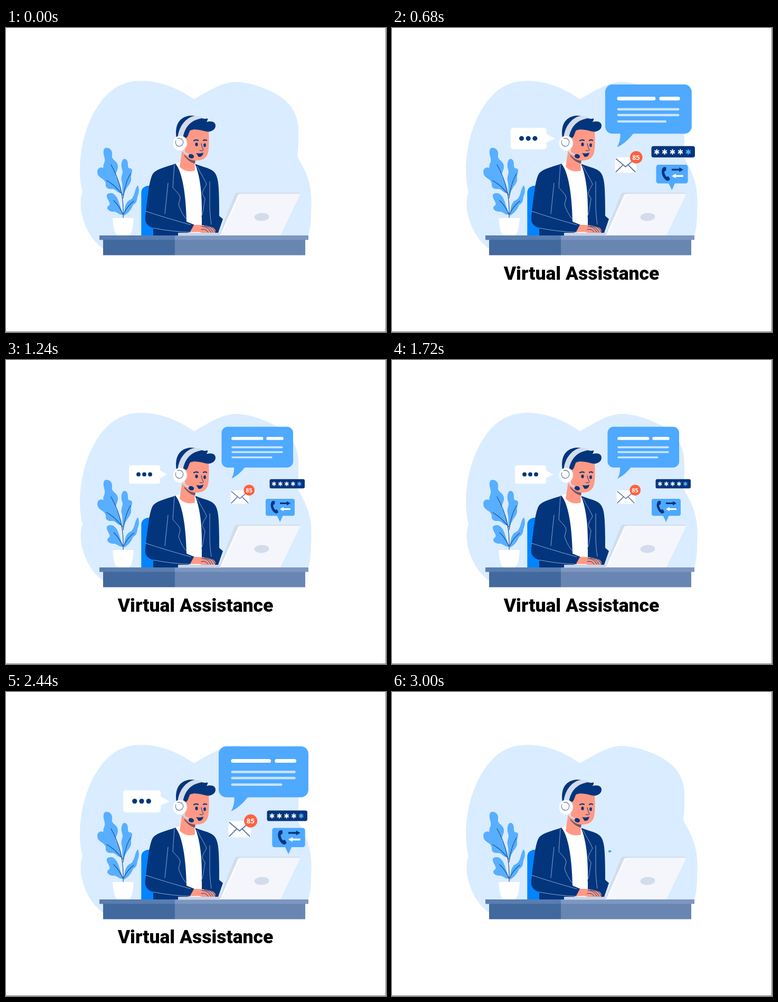
An HTML page with a canvas for the animation above (3.04 s loop, 720 px wide and 576 px high).

```html
<!DOCTYPE html>
<html lang="en">
<head>
<meta charset="utf-8">
<title>Virtual Assistance</title>
<style>
  html, body { margin: 0; width: 100%; height: 100%; overflow: hidden; background: #fff; }
  canvas { display: block; width: 720px; height: 576px; }
</style>
</head>
<body>
<canvas id="stage" width="720" height="576"></canvas>
<script>
const ctx = document.getElementById('stage').getContext('2d');
const LOOP = 3040, STEP = 40;
const NAVY = '#03357d', SKY = '#4ea9ff', LEAF = '#58afff', SKIN = '#ff9985', GREY = '#d3dcea', SEAM = '#8ba6cf';

function fill(d, color) {
  ctx.fillStyle = color;
  ctx.fill(new Path2D(d));
}

function line(d, color, width = 1, cap = 'round') {
  ctx.strokeStyle = color;
  ctx.lineWidth = width;
  ctx.lineCap = cap;
  ctx.lineJoin = 'round';
  ctx.stroke(new Path2D(d));
}

function oval(x, y, rx, ry, color, turn = 0) {
  ctx.fillStyle = color;
  ctx.beginPath();
  ctx.ellipse(x, y, rx, ry, turn, 0, Math.PI * 2);
  ctx.fill();
}

function box(x, y, w, h, color, r = 0) {
  ctx.fillStyle = color;
  ctx.beginPath();
  ctx.roundRect(x, y, w, h, r);
  ctx.fill();
}

function backdrop() {
  box(0, 0, 720, 576, '#fff');
  fill('M356 135C325 113 290 100 257 100C225 100 200 112 178 142C155 174 140 220 140 270C140 286 142 300 145 311C140 322 141 340 143 350C149 380 165 405 184 418V400H570C577 385 578 365 578 350C579 335 579 322 577 306C573 280 563 262 552 244C553 232 555 215 554 190C552 160 538 140 510 124C485 110 455 102 433 102C405 104 380 122 356 135Z', '#daecff');
}

function plant() {
  fill('M190 227C198 227 202 233 201 241C199 250 211 251 212 261C213 270 205 276 209 284C213 292 218 300 219 310C211 302 208 288 197 281C188 275 181 266 186 256C190 248 183 240 185 232Q186 227 190 227Z', LEAF);
  fill('M174 268C178 262 186 264 188 269C191 276 201 274 207 280C215 288 213 300 220 313C213 315 209 306 202 305C192 306 188 302 189 295C188 284 173 286 173 272Q173 270 174 268Z', LEAF);
  fill('M224 248C230 248 231 254 231 260C231 267 234 265 238 267C241 272 236 277 237 285C238 296 227 300 222 319C219 309 222 300 219 290C217 280 223 276 220 268C217 260 219 249 224 248Z', LEAF);
  fill('M250 298C253 305 252 314 249 320C248 327 248 331 241 335C238 341 236 348 223 356C225 346 224 338 229 331C232 325 238 327 241 319C245 312 244 304 250 298Z', LEAF);
  fill('M191 316C195 311 203 312 207 317C213 323 214 332 222 354C213 354 210 347 203 348C194 348 189 341 194 337C202 333 189 324 191 316Z', LEAF);
  line('M222 359C223 325 219 295 199 259M221 316C207 299 199 294 191 289M222 322C225 300 231 284 236 276M223 352Q230 337 242 328M222 354Q214 336 204 327', '#1c5198', 1.2);
  fill('M202 360H242C241 375 239 385 236 390Q234 393 230 393H214Q210 393 208 390C204 383 203 370 202 360Z', '#fff');
}

function body() {
  fill('M256.3 394V313C256 303 263 298.5 274 298.5L292 394Z', '#0084ff');
  fill('M321 257C305 263 287 266 279 275C271 286 268 325 264 357C262 370 270 376 279 379V394H350L372 388H402L411 362L404 356C404 345 404 325 403 305C402 288 400 276 391 270C384 265 372 263 360 258Z', NAVY);
  fill('M321 257L334 252L358 257C367 278 371 310 371 340V388H346L342 366C341 315 334 272 321 257Z', '#fff');
  fill('M335 364L357 373L349 387H335Z', NAVY);
  line('M319 259L316 302C322 310 329 314 330 322L327 335C331 346 336 356 342 362M362 262C369 276 376 286 380 296C376 304 372 308 372 315L377 323C375 338 373 350 370 358M307 294L301 352M264 347Q300 359 350 373M279 379Q315 386 350 387M386 291V340Q387 360 389 372', SEAM);
  fill('M356 373C370 373 384 374 392 378C397 381 398 385 396 388H371C364 385 355 388 349 386Z', SKIN);
  line('M371 376Q383 376 388 387M376 375Q387 376 392 387M382 375Q393 377 396 386M370 382Q378 379 383 387', NAVY, 1);
}

function head() {
  fill('M334 230L329 263C338 272 348 273 358 270L357 250Z', SKIN);
  fill('M338 240C345 248 352 252 359 250L358 257C350 255 344 250 338 243Z', '#765763');
  fill('M342 198C352 188 370 190 384 195C385 212 385 230 382 239C378 249 368 252 356 251C345 249 338 239 338 224Z', SKIN);
  fill('M323 208C320 190 324 168 350 166C362 166 368 171 376 172C381 172 383 170 382 174L380 178C391 175 397 179 397 185C397 193 388 198 379 196C370 194 358 190 349 194C346 198 346 204 342 208Z', NAVY);
  fill('M325.5 206C328 186 341 169 358 166.5Q367 167 375 170.5C352 173 340 185 335.5 206Z', GREY);
  line('M335 233Q341 239 349 242', GREY, 3);
  oval(332, 218, 11.5, 13.5, GREY);
  oval(329.5, 218.5, 12.8, 14, '#fff');
  ctx.strokeStyle = '#5d7396';
  ctx.lineWidth = 1.1;
  ctx.beginPath();
  ctx.ellipse(328.5, 216.5, 7.3, 7.6, 0, -2, 3.6);
  ctx.stroke();
  oval(351, 243, 5.2, 4, NAVY, 0.35);
  line('M356 213.5Q360 211 364 213M374 213Q377 211 380 213', NAVY, 2.2);
  oval(361, 220.5, 2.6, 3.5, NAVY);
  oval(376.5, 222, 2.4, 3.5, NAVY);
  line('M370 219Q371 226 374 231Q372 234 367 232', NAVY, 1);
  fill('M360 237C366 238 370 238 374 236C373 242 369 245 365 244C363 242 363 240 360 237Z', NAVY);
}

function desk() {
  box(184, 401, 136, 29.5, '#42699e');
  box(320, 401, 247, 29.5, '#6986b2');
  box(177, 393, 149, 8.5, '#597db0');
  box(320, 393, 253, 8.5, '#7d97c2');
  box(326, 388, 80, 5.5, '#cbd5e6');
}

function laptop() {
  fill('M403 393L434 314Q435 312 438 312H556L557 315L440 316L408 393Z', GREY);
  fill('M405 393L440 316Q441 314 443 314H558L520 392.5Z', '#f4f6fb');
  line('M409 390L441 318', '#fff', 1.5);
  oval(484.5, 358, 14, 7.5, GREY, -0.06);
}

function title(s) {
  const left = Math.max(0, 1 - Math.max(0, s - 240) / 421);
  if (left === 1) return;
  ctx.font = '900 35.5px Roboto, sans-serif';
  ctx.textAlign = 'center';
  ctx.textBaseline = 'alphabetic';
  ctx.fillStyle = '#000';
  ctx.fillText('Virtual Assistance', 359, 477 - 47 * left * left);
}

function dots() {
  box(233, 199.5, 59, 35, '#fff', 4);
  fill('M291 209L306 217L291 224Z', '#fff');
  for (let i = 0; i < 3; i++) oval(251 + 11 * i, 216.7, 3.9, 3.9, NAVY);
}

function speech() {
  box(407.5, 122.5, 141.5, 80.5, SKY, 12);
  fill('M432 200C433 210 431 218 427 225C438 220 447 211 454 202Z', SKY);
  line('M430 145.5H487M499 145.5H527', '#fff', 6);
  line('M429 163H527M429 172.5H527M429 183H506', '#cbe5ff', 3.8);
}

function pin() {
  box(496.5, 225, 72.5, 19, NAVY, 3.5);
  for (let i = 0; i < 5; i++) {
    const x = 505.5 + 13.1 * i;
    for (let j = 0; j < 3; j++) {
      const a = Math.PI * (j / 3 + 0.5), dx = 4.5 * Math.cos(a), dy = 4.5 * Math.sin(a);
      line(`M${x - dx} ${234.7 - dy}L${x + dx} ${234.7 + dy}`, i < 4 ? '#fff' : LEAF, 1.9, 'butt');
    }
  }
}

function call() {
  box(492, 263, 55, 32.3, SKY, 4);
  fill('M513 294L519.3 307L525 294Z', SKY);
  fill('M505 267L509 267Q510 270 509 273L506 275Q507 281 510 284L513 283Q516 286 516 289L512 291C503 288 498 272 505 267Z', NAVY);
  fill('M519 270H532V267.5L539 271.5L532 275.5V273H519Z', NAVY);
  fill('M539 281H526V278.5L519 282.5L526 286.5V284H539Z', '#fff');
}

function mail() {
  box(425.5, 247, 35.5, 25.5, '#fff', 1);
  line('M427 249L443 262.5L459 249M427 271L438.5 259.5M459 271L447.5 259.5', '#5873a3', 1.6);
  oval(460.7, 246.7, 10.4, 10.4, '#ff6240');
  ctx.font = 'bold 11px "Open Sans", sans-serif';
  ctx.textAlign = 'center';
  ctx.textBaseline = 'alphabetic';
  ctx.fillStyle = '#fff';
  ctx.fillText('85', 460.5, 250.7);
}

// keys: time in ms, then scale around (x, y)
const pops = [
  { draw: dots, x: 287, y: 266, keys: [[140, 0], [240, 0.28], [440, 1.01], [540, 1.2], [600, 1.2], [920, 1.01], [1120, 1]] },
  { draw: mail, x: 446, y: 259, keys: [[60, 0], [240, 0.54], [440, 1.1], [560, 1.21], [600, 1.2], [900, 1]] },
  { draw: call, x: 401, y: 304.5, keys: [[0, 0], [40, 0.1], [240, 0.6], [440, 1.08], [540, 1.15], [600, 1.135], [900, 1]] },
  { draw: speech, x: 430, y: 220, size: 0.958, keys: [[230, 0], [440, 0.845], [560, 1.22], [610, 1.25], [920, 1.044], [1120, 1]] },
  { draw: pin, x: 533, y: 234.5, size: 0.917, keys: [[310, 0], [440, 0.515], [600, 1.15], [680, 1.24], [920, 1.09], [1140, 1]] }
];

// Smooth cubic through the keys, coming to rest at the last one
function valueAt(keys, t) {
  const last = keys.length - 1;
  if (t <= keys[0][0]) return keys[0][1];
  if (t >= keys[last][0]) return keys[last][1];
  const i = keys.findIndex(k => k[0] > t) - 1;
  const slope = n => {
    if (n === last) return 0;
    const a = keys[Math.max(0, n - 1)], b = keys[n + 1];
    return (b[1] - a[1]) / (b[0] - a[0]);
  };
  const [t0, a] = keys[i], [t1, b] = keys[i + 1];
  const d = t1 - t0, u = (t - t0) / d, v = 1 - u;
  return a * v * v * (1 + 2 * u) + b * u * u * (3 - 2 * u) + d * u * v * (slope(i) * v - slope(i + 1) * u);
}

function pop(item, s) {
  const k = valueAt(item.keys, s) * (item.size || 1);
  if (k <= 0.005) return;
  ctx.save();
  ctx.translate(item.x, item.y);
  ctx.scale(k, k);
  ctx.translate(-item.x, -item.y);
  item.draw();
  ctx.restore();
}

function render(now) {
  const t = Math.floor((now % LOOP) / STEP) * STEP;
  const s = Math.min(t, LOOP - t); // plays forward, then back
  backdrop();
  title(s);
  plant();
  body();
  head();
  desk();
  laptop();
  for (const item of pops) pop(item, s);
  box(719, 0, 1, 576, '#7d7d7d');
  box(0, 575, 720, 1, '#7d7d7d');
  requestAnimationFrame(render);
}
requestAnimationFrame(render);
</script>
</body>
</html>
```
